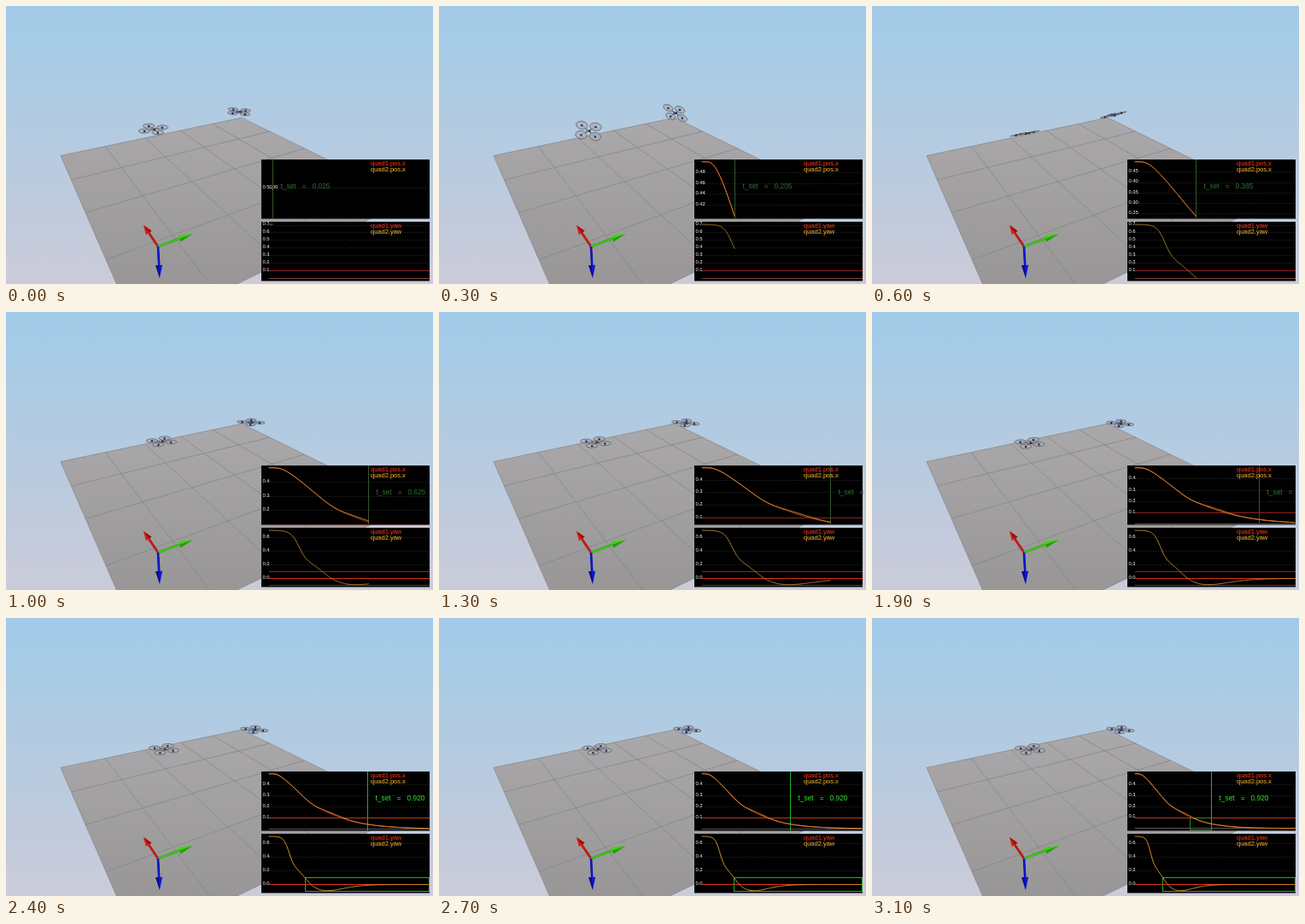
Write an HTML page with a canvas that moves like this. It is 500 px wide and 326 px high and loops after 3200 ms.

```html
<!DOCTYPE html>
<html lang="en">
<head>
<meta charset="utf-8">
<title>Quadrotor settling time</title>
<style>
  html, body { margin: 0; width: 100%; height: 100%; overflow: hidden; background: #b4cce0; }
  canvas { display: block; width: 500px; height: 326px; }
</style>
</head>
<body>
<canvas id="stage" width="500" height="326"></canvas>
<script>
const ctx = document.getElementById('stage').getContext('2d');
const STEP_MS = 100, STEPS = 32, SETTLED = 0.92;
const RED = '#ff3c18', ORANGE = '#ffb92e', GREEN = '#25b025';
const FONT = '"Liberation Sans", Arial, sans-serif';

const bump = (t, centre, width) => Math.exp(-(((t - centre) / width) ** 2));
const fall = (t, centre, width) => 1 / (1 + Math.exp((t - centre) / width));

// Critically damped approach to zero with a soft delayed start.
function pos(t) {
  const x = 4.5 * t ** 3 / (t * t + .0049);
  return .5 * (1 + x) * Math.exp(-x) - .013 * bump(t, .4, .1);
}
const posLagging = t => pos(t) + .01 * bump(t, .62, .13);

// Two-stage drop followed by an undershoot that dies out.
function yaw(t) {
  const z = t / .53;
  return .45 * fall(t, .187, .025) + .26 * fall(t, .335, .045)
    - .093 * (z * Math.exp(1 - z)) ** 12;
}

// Lean into the move, then lean back to brake.
const pitch = t => .7 * bump(t, .17, .075) - .5 * bump(t, .41, .14);

function line(x0, y0, x1, y1, color, width = 1) {
  ctx.strokeStyle = color;
  ctx.lineWidth = width;
  ctx.beginPath();
  ctx.moveTo(x0, y0);
  ctx.lineTo(x1, y1);
  ctx.stroke();
}

function polygon(points, fill) {
  ctx.fillStyle = fill;
  ctx.beginPath();
  points.forEach(p => ctx.lineTo(...p));
  ctx.fill();
}

function label(text, x, y, size, color) {
  ctx.font = `${size}px ${FONT}`;
  ctx.textBaseline = 'middle';
  ctx.fillStyle = color;
  ctx.fillText(text, x, y);
}

function gradient(y0, y1, from, to) {
  const g = ctx.createLinearGradient(0, y0, 0, y1);
  g.addColorStop(0, from);
  g.addColorStop(1, to);
  return g;
}

// Floor point in cells, from the far left corner and two vanishing points.
function floorPoint(u, v) {
  const a = .0618 * u, b = -.131 * v, w = 1 + a + b;
  return [(64 + 962 * a - 18 * b) / w, (175.5 - 13 * a - 13 * b) / w];
}

function drawFloor() {
  const across = 5, deep = 4;
  polygon([[0, 0], [across, 0], [across, deep], [0, deep]].map(p => floorPoint(...p)),
    gradient(131, 326, '#aaa8aa', '#989696'));
  for (let u = 0; u <= across; u++) {
    line(...floorPoint(u, 0), ...floorPoint(u, deep), '#858384', .7);
  }
  for (let v = 0; v <= deep; v++) {
    line(...floorPoint(0, v), ...floorPoint(across, v), '#858384', .7);
  }
}

function drawArrow(x, y, head, color, shade) {
  const ox = 178, oy = 282, half = 4, length = Math.hypot(x - ox, y - oy);
  const dx = (x - ox) / length, dy = (y - oy) / length;
  const bx = x - dx * head, by = y - dy * head;
  const left = [bx + dy * half, by - dx * half], right = [bx - dy * half, by + dx * half];
  line(ox, oy, bx, by, shade, 2.6);
  line(ox, oy, bx, by, color, 1.5);
  polygon([[x, y], left, right], color);
  polygon([[x, y], [bx, by], right], shade);
}

// rest: final place, travel: screen shift per metre, forward and side: body axes on screen.
const quads = [
  { rest: [291, 131], travel: [-36, -14], forward: [-28, -12], side: [36, -6], accent: '#4c62b4' },
  { rest: [185, 154], travel: [-25, -19], forward: [-20, -17], side: [48, -8], accent: '#c89a28' }
];

function drawQuad({ rest, travel, forward, side, accent }, t) {
  const heading = yaw(t), c = Math.cos(heading), s = Math.sin(heading);
  const [sx, sy] = side, tilt = pitch(t);
  const fx = forward[0] * Math.cos(tilt);
  const fy = forward[1] * Math.cos(tilt) - 42 * Math.sin(tilt);
  ctx.save();
  ctx.translate(rest[0] + travel[0] * pos(t), rest[1] + travel[1] * pos(t));
  const hubs = [[1, 1], [1, -1], [-1, -1], [-1, 1]].map(([a, b]) => {
    const f = .16 * (a * c - b * s), r = .16 * (a * s + b * c);
    return [f * fx + r * sx, f * fy + r * sy];
  });
  hubs.forEach(([x, y]) => line(0, 0, x, y, '#40434c', 1));
  hubs.sort((a, b) => a[1] - b[1]).forEach(([x, y]) => {
    ctx.save();
    ctx.translate(x, y);
    ctx.transform(fx, fy, sx, sy, 0, 0);
    ctx.beginPath();
    ctx.arc(0, 0, .13, 0, Math.PI * 2);
    ctx.restore();
    ctx.fillStyle = 'rgba(172,175,184,.75)';
    ctx.fill();
    ctx.strokeStyle = '#5d6068';
    ctx.lineWidth = .8;
    ctx.stroke();
    ctx.fillStyle = '#232a54';
    ctx.fillRect(x - 1.1, y - .8, 2.2, 2.2);
  });
  ctx.fillStyle = '#30344c';
  ctx.fillRect(-2.5, -1, 5, 2.4);
  ctx.fillStyle = accent;
  ctx.fillRect(-2.5, -.8, 2.4, 1.8);
  ctx.restore();
}

const LEFT = 307.8, RIGHT = 496, WIDTH = 187.5;
const snap = v => Math.floor(v) + .5;

// Smallest 1-2-5 step that is not below the given minimum.
function niceStep(min) {
  const power = 10 ** Math.floor(Math.log10(min));
  return [1, 2, 5, 10].map(m => m * power).find(s => s * 1.0001 >= min);
}

// Draws one auto-scaled plot; lo and hi are the values at its lower and upper edge.
function drawPlot({ top, lo, hi, t, span, name, curves, overlay }) {
  const bottom = top + 69.5;
  const scale = 64 / (hi - lo);
  const X = time => LEFT + time * WIDTH / span;
  const Y = value => top + 2.7 + (hi - value) * scale;
  ctx.save();
  ctx.beginPath();
  ctx.rect(299, top, RIGHT - 299, bottom - top);
  ctx.fillStyle = '#000';
  ctx.fill();
  ctx.clip();

  const step = niceStep(Math.max(.0005, 8.5 / scale));
  const digits = Math.ceil(-Math.log10(step) - 1e-9);
  for (let i = Math.ceil(lo / step); i * step <= hi; i++) {
    const y = Y(i * step);
    if (y < top + 4 || y > bottom - 5) continue;
    ctx.setLineDash([1, 2]);
    line(LEFT, snap(y), RIGHT, snap(y), '#303030');
    ctx.setLineDash([]);
    label((i * step).toFixed(digits), 300.5, y - 1.2, 5.8, '#fff');
  }
  overlay(X, Y);

  const end = span > 1 ? span : t;
  curves.forEach(([curve, color]) => {
    ctx.strokeStyle = color;
    ctx.lineWidth = 1;
    ctx.beginPath();
    for (let k = 0; k <= 200; k++) ctx.lineTo(X(end * k / 200), Y(curve(end * k / 200)));
    ctx.stroke();
  });
  label('quad1.' + name, 427, top + 4.8, 7.5, RED);
  label('quad2.' + name, 427, top + 12, 7.5, ORANGE);
  ctx.restore();
}

function drawPlots(t) {
  const span = Math.max(1, t * 1.015);
  const settled = t > SETTLED + .4;
  const time = Math.min(t, SETTLED);
  const cursor = snap(LEFT + time * WIDTH / span);
  const level = (Y, value, color) => line(LEFT, snap(Y(value)), RIGHT, snap(Y(value)), color);
  const box = (x0, y0, x1, y1, color) => {
    ctx.strokeStyle = color;
    ctx.lineWidth = 1;
    ctx.strokeRect(snap(x0), snap(y0), snap(x1) - snap(x0), snap(y1) - snap(y0));
  };

  const margin = Math.max(0, (.00103 - .5 + pos(t)) / 2);
  drawPlot({
    top: 180, t, span, name: 'pos.x', lo: pos(t) - margin, hi: .5 + margin,
    curves: [[pos, '#d8401c'], [posLagging, '#d8922c']],
    overlay(X, Y) {
      level(Y, .1, settled ? '#b83a18' : '#96201a');
      level(Y, 0, '#555');
      if (t > SETTLED + .76) box(X(.658), Y(.1), cursor, 248, '#2a8a2a');
      line(cursor, 180, cursor, 250, settled ? GREEN : '#35552f');
    }
  });
  const color = settled ? '#35e035' : '#2f702f';
  label('t_set', cursor + 9, 212, 8.4, color);
  label('=', cursor + 34.3, 212, 8.4, color);
  label(time.toFixed(3), cursor + 46, 212, 8.4, color);

  drawPlot({
    top: 253, t, span, name: 'yaw', lo: Math.min(0, yaw(Math.min(t, .54))), hi: .715,
    curves: [[yaw, settled ? '#d8922c' : '#b08630']],
    overlay(X, Y) {
      level(Y, 0, t < .4 ? '#80403a' : '#e03018');
      if (settled) {
        box(X(.335), Y(.1), 495, Y(-.1), GREEN);
      } else {
        level(Y, .1, '#96201a');
        level(Y, -.1, '#96201a');
      }
    }
  });
}

const start = performance.now();
function draw() {
  const step = Math.floor((performance.now() - start) / STEP_MS) % STEPS;
  const t = .025 + .06 * step;
  ctx.fillStyle = gradient(0, 326, '#a0cbe8', '#cbcbd9');
  ctx.fillRect(0, 0, 500, 326);
  drawFloor();
  quads.forEach(quad => drawQuad(quad, t));
  drawArrow(161, 257, 11, '#d81a12', '#a00c08');
  drawArrow(219, 267, 17, '#3fd414', '#289a0c');
  drawArrow(180, 319, 15, '#1018d8', '#080c94');
  drawPlots(t);
  requestAnimationFrame(draw);
}
draw();
</script>
</body>
</html>
```
